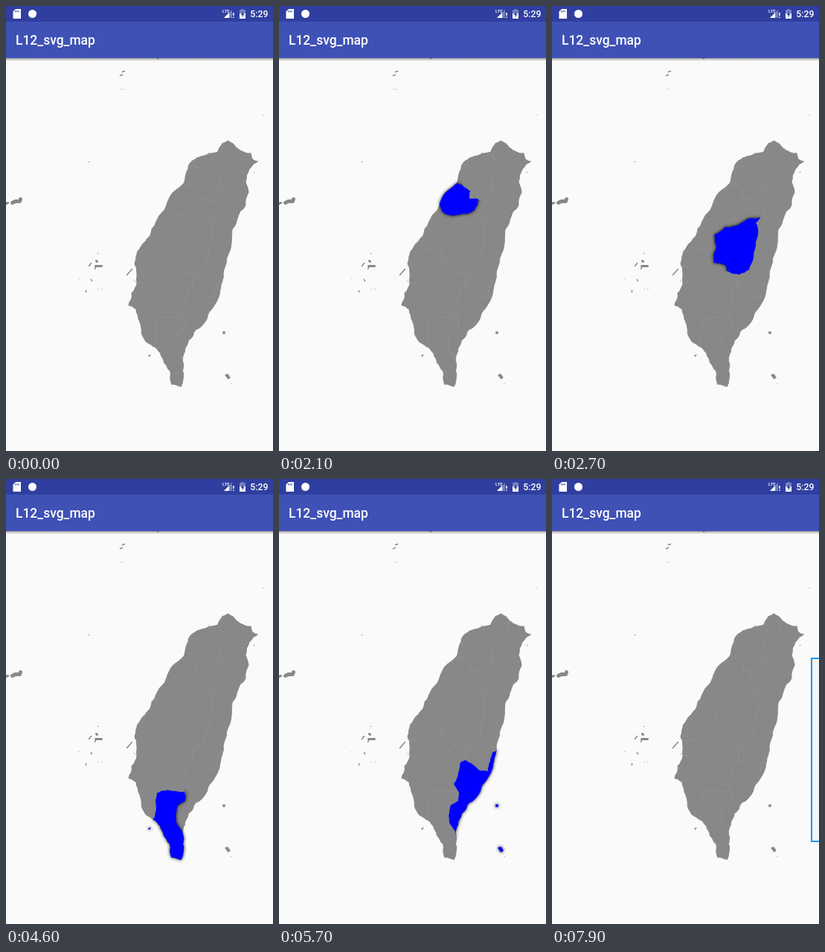
These frames come from a looping animation (359x598 px, 8 s). An HTML page:

```html
<!DOCTYPE html>
<html lang="en">
<head>
<meta charset="utf-8">
<title>L12_svg_map</title>
<style>
  html, body { margin: 0; width: 100%; height: 100%; overflow: hidden; background: #fafafa; }
  svg { display: block; width: 359px; height: 598px; }
  text { font-family: Roboto, sans-serif; font-weight: 500; fill: #fff; }
  .land { fill: #888; }
  .line { fill: none; stroke: #949494; stroke-width: .6; }
  .islet { fill: none; stroke: #888; stroke-linecap: round; stroke-linejoin: round; }
  .region { fill: #888; stroke: #949494; stroke-width: .6; stroke-linejoin: round; }
  .region.on { fill: #00f; stroke: #00f; filter: drop-shadow(0 0 2px #000); }
</style>
</head>
<body>
<svg viewBox="0 0 359 598">
  <defs>
    <linearGradient id="fade" x2="0" y2="1">
      <stop stop-color="#000" stop-opacity=".38"/>
      <stop offset="1" stop-color="#000" stop-opacity="0"/>
    </linearGradient>
  </defs>
  <g id="map" transform="translate(.5 .5)">
    <path class="islet" stroke-width="5" d="M8 264l4-2l6 0l1-3"/>
    <path class="islet" stroke-width="3" d="M0 265l2-1M120 349h8M121 342l1 1M296 496l2 2"/>
    <path class="islet" stroke-width="1.5" d="M153 93l3-1M156 88l3-1M111 349l3-4M119 353l2-4M162 361l7-8M114 367l1 2M107 382v2M203 70h1M192 469v0M333 223v0M123 332v0M111 209v0"/>
    <path class="islet" stroke-width="1" opacity=".5" d="M154 111h1M157 112h1M345 146h1M97 366h1M123 380h1M128 380h1M302 507h1"/>
  </g>

  <rect y="70" width="359" height="4" fill="url(#fade)"/>
  <rect width="359" height="70" fill="#3f51b5"/>
  <rect width="359" height="21" fill="#303f9f"/>
  <text x="13" y="52" font-size="17.45">L12_svg_map</text>
  <text x="352.5" y="15" font-size="12.3" text-anchor="end">5:29</text>
  <text x="291" y="9" font-size="6">LTE</text>
  <g fill="#fff">
    <path d="M13 4H20V17H9.5V7.500Z"/>
    <path d="M12.700 6v2.500M14.900 6v2.500M17.100 6v2.500" stroke="#303f9f"/>
    <circle cx="35.500" cy="10.500" r="5.500"/>
    <path d="M304 5V16H293Z" opacity=".35"/>
    <path d="M300 9V16H293Z"/>
    <path d="M305.200 9h1.500v4h-1.500zM305.200 14.500h1.500v1.500h-1.500z"/>
    <path d="M316.500 4h3v1.300h2.500V17h-8V5.300h2.500z" opacity=".35"/>
    <path d="M314 10h8v7h-8z"/>
    <path d="M318.700 7L315.800 12H317.700V15.500L320.500 10.500H318.700Z" fill="#303f9f"/>
  </g>
  <rect id="panel" x="349" y="241" width="40" height="246" fill="#f4f4f4" stroke="#2196e8" stroke-width="2"/>
</svg>
<script>
const LOOP = 8000;
const PANEL_AT = 7900;
const schedule = [
  [0, ''], [1300, 'hsinchu'], [2100, 'miaoli'], [2700, 'nantou'],
  [3300, 'taitung'], [4600, 'pingtung'], [5700, 'taitung'], [7400, '']
];

let seed = 7;
const random = () => (seed = seed * 16807 % 2147483647) / 2147483647;

// Splits a straight edge again and again, nudging each midpoint sideways
function roughEdge([x1, y1], [x2, y2]) {
  const dx = x2 - x1, dy = y2 - y1;
  if (Math.hypot(dx, dy) < 5) return [[x2, y2]];
  const nudge = (random() - .5) * .2;
  const mid = [(x1 + x2) / 2 - dy * nudge, (y1 + y2) / 2 + dx * nudge];
  return [...roughEdge([x1, y1], mid), ...roughEdge(mid, [x2, y2])];
}

function rough(text) {
  const keys = text.split(' ').map(pair => pair.split(',').map(Number));
  return keys.reduce((points, key) => [...points, ...roughEdge(points.at(-1), key)], [keys.shift()]);
}

const roughAll = lines => Object.fromEntries(
  Object.entries(lines).map(([name, text]) => [name, rough(text)]));
const shape = (...parts) => `M${parts.flat().join(' ')}Z`;
const reverse = points => [...points].reverse();

// Key points of the coast, clockwise from the north-west
const coast = roughAll({
  north: '242,222 250,207 262,201 284,195 290,184 298,180 310,190 329,197 331,205 339,208 327,219 322,236 326,250 322,267 310,287',
  east: '310,287 303,311 297,337 292,364',
  southEast: '292,364 285,392 268,423 245,449 238,469 238,480',
  south: '238,480 238,500 235,511 222,508 220,490 207,466 197,457',
  southWest: '197,457 187,450 179,424',
  west: '179,424 174,407 164,402 168,385 175,371 172,345 176,329 190,311 202,287 216,264',
  northWest: '216,264 226,248 238,238',
  city: '238,238 242,222'
});

// Key points of the borders between regions
const border = roughAll({
  nantouEast: '251,361 265,354 271,337 274,321 277,304 274,291 280,284',
  nantouWest: '280,284 254,291 232,297 218,307 221,324 217,344 233,347 235,356',
  nantouSouth: '235,356 251,361',
  taitungNorth: '250,377 268,390 280,392 287,366 292,364',
  taitungWest: '241,424 234,409 240,395 243,380 250,377',
  pingtungEast: '241,424 240,432 230,438 228,458 238,480',
  pingtungNorth: '197,457 202,421 217,417 240,419 241,424',
  kaohsiungWest: '179,424 214,393 217,373 235,356',
  hualienNorth: '280,284 285,271 310,287',
  hsinchuNorth: '242,222 249,213 265,222 276,234 278,244 286,248',
  hsinchuEast: '286,248 280,264 268,259',
  hsinchuWest: '247,241 246,235 255,231 253,227 242,222',
  miaoliNorth: '247,241 257,248 256,258 268,259',
  miaoliSouth: '268,259 262,274 222,278 216,264'
});

const innerBorders = [
  '272,196 283,214 288,229 286,248', '292,183 288,203 296,212 307,203 308,189',
  '327,219 309,222 298,236 286,248', '198,296 218,307', '175,330 217,330',
  '172,348 217,344', '171,368 188,373 217,373'
];

const regions = {
  taitung: shape(coast.southEast, reverse(border.pingtungEast), border.taitungWest, border.taitungNorth) +
    'M291 437h3v3h-3zM294 495l4-1l3 5l-3 2z',
  pingtung: shape(coast.south, border.pingtungNorth, border.pingtungEast) + 'M191 469l3-1l-2 3z',
  nantou: shape(border.nantouEast, border.nantouWest, border.nantouSouth),
  kaohsiung: shape(coast.southWest, border.kaohsiungWest, border.nantouSouth,
    reverse(border.taitungWest), reverse(border.pingtungNorth)),
  hualien: shape(coast.east, reverse(border.taitungNorth), border.nantouEast, border.hualienNorth),
  miaoli: shape(coast.northWest, border.miaoliNorth, border.miaoliSouth),
  hsinchu: shape(border.hsinchuNorth, border.hsinchuEast, reverse(border.miaoliNorth), border.hsinchuWest)
};

const map = document.getElementById('map');
const panel = document.getElementById('panel');

function addPath(className, d) {
  const path = document.createElementNS('http://www.w3.org/2000/svg', 'path');
  path.setAttribute('class', className);
  path.setAttribute('d', d);
  map.append(path);
  return path;
}

addPath('land', shape(...Object.values(coast)));
addPath('line', innerBorders.map(text => 'M' + rough(text).join(' ')).join(''));
const paths = Object.entries(regions).map(([name, d]) => [name, addPath('region', d)]);

function draw() {
  const time = performance.now() % LOOP;
  const active = schedule.findLast(([start]) => start <= time)[1];
  for (const [name, path] of paths) path.classList.toggle('on', name === active);
  panel.style.display = time >= PANEL_AT ? '' : 'none';
  requestAnimationFrame(draw);
}
draw();
</script>
</body>
</html>
```
